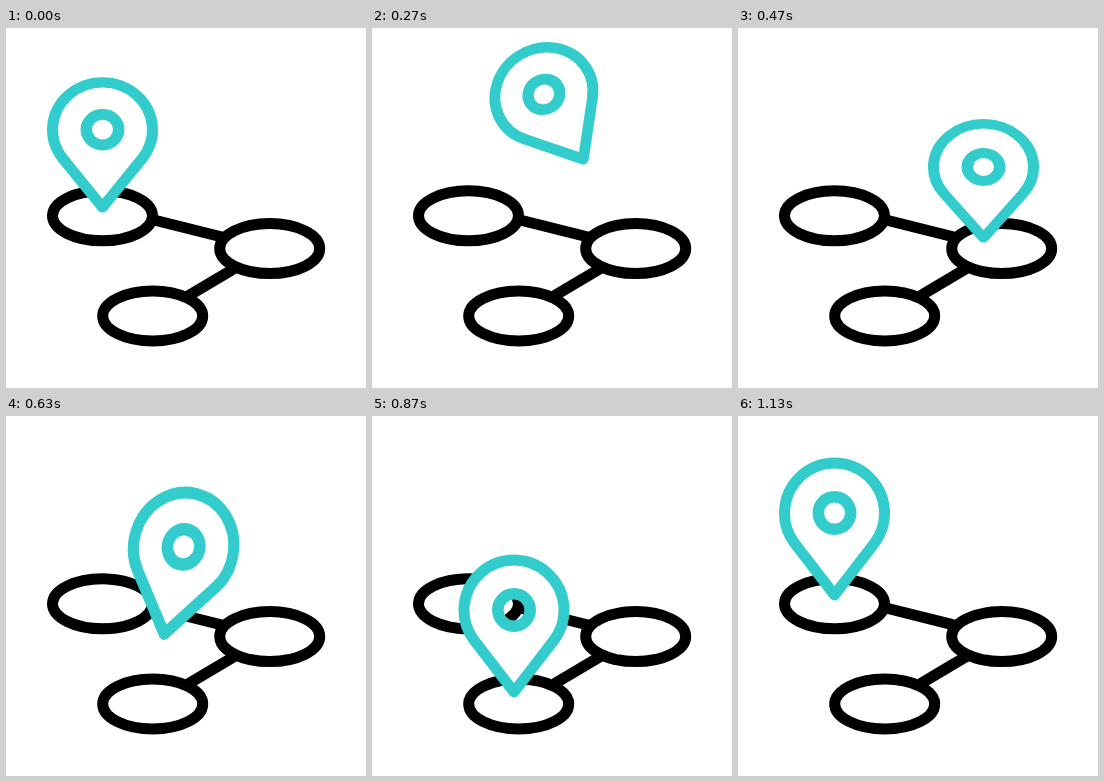
Animation of 360x360 px, one loop 1.67 s. Source, as an HTML page:

```html
<!DOCTYPE html>
<html lang="en">
<head>
<meta charset="utf-8">
<title>Route pin</title>
<style>
  html, body { margin: 0; width: 100%; height: 100%; overflow: hidden; background: #fff; }
  svg { display: block; width: 100%; height: 100%; }
  g { fill: none; stroke-width: 11; stroke-linejoin: round; }
</style>
</head>
<body>
<svg viewBox="0 0 360 360">
  <g stroke="#000">
    <path d="M146 191.5 L218 209.5 M230 239.5 L182 268"/>
    <ellipse cx="96.5" cy="187.8" rx="50" ry="25"/>
    <ellipse cx="263.7" cy="220.6" rx="50" ry="25"/>
    <ellipse cx="146.7" cy="288" rx="50" ry="25"/>
  </g>
  <!-- The pin's origin is its tip -->
  <g id="pin" stroke="#33cccc">
    <path fill="#fff" fill-rule="evenodd" stroke="none"
      d="M0 -6 L-39.7 -57.5 A50 50 0 1 1 39.7 -57.5 Z M-16 -88 a16 16 0 1 0 32 0 a16 16 0 1 0 -32 0 Z"/>
    <path d="M0 -6 L-39.7 -57.5 A50 50 0 1 1 39.7 -57.5 Z"/>
    <circle cy="-88" r="16.2" stroke-width="11.5"/>
  </g>
</svg>
<script>
const LOOP = 1670, LAST = 34, SQUASH = .17;

const easeIn = u => u * u;
const easeOut = power => u => 1 - (1 - u) ** power;
const lerp = (a, b, u) => a + (b - a) * u;
const arc = u => Math.max(0, Math.sin(Math.PI * u)) ** .7;

const left = { x: 96.5, y: 185 }, right = { x: 245.5, y: 215 }, front = { x: 142, y: 282 };

// The pin rests on `from` since `rest`, then flies from step `start` to `end`
const hops = [
  { from: left, to: right, rest: -.4, start: 3.6, end: 12.8,
    easeX: easeOut(2.4), easeY: easeIn, lift: 56, tilt: -31.4, stretch: -.075 },
  { from: right, to: front, rest: 12.8, start: 14.5, end: 22.6,
    easeX: easeOut(2.4), easeY: easeIn, lift: 11.5, tilt: 12.7, stretch: .09 },
  { from: front, to: left, rest: 22.6, start: 26, end: LAST,
    easeX: easeOut(1.15), easeY: easeOut(2.4), lift: 0, tilt: 13.7, stretch: .115 }
];

function poseAt(step) {
  const hop = hops.find(h => step <= h.end);
  const { from, to, rest, start, end } = hop;
  if (step < start) {
    const w = (step - rest) / (start - rest);
    return { ...from, tilt: 0, scale: 1 - SQUASH * Math.sin(Math.PI * w) };
  }
  const u = (step - start) / (end - start);
  return {
    x: lerp(from.x, to.x, hop.easeX(u)),
    y: lerp(from.y, to.y, hop.easeY(u)) - hop.lift * 4 * u * (1 - u),
    tilt: hop.tilt * arc(u),
    scale: 1 + hop.stretch * arc(u)
  };
}

// 30 steps per second, snapped to 10 ms
function stepAt(t) {
  let n = Math.floor(t * .03 + .11);
  if (Math.round(n * 10 / 3) * 10 > t) n--;
  return Math.min(n, LAST);
}

const pin = document.getElementById("pin");

function draw(t) {
  const { x, y, tilt, scale } = poseAt(stepAt(t));
  pin.setAttribute("transform", `translate(${x} ${y}) rotate(${tilt}) scale(1 ${scale})`);
}

const begin = performance.now();
function tick() {
  draw((performance.now() - begin) % LOOP);
  requestAnimationFrame(tick);
}
tick();
</script>
</body>
</html>
```
